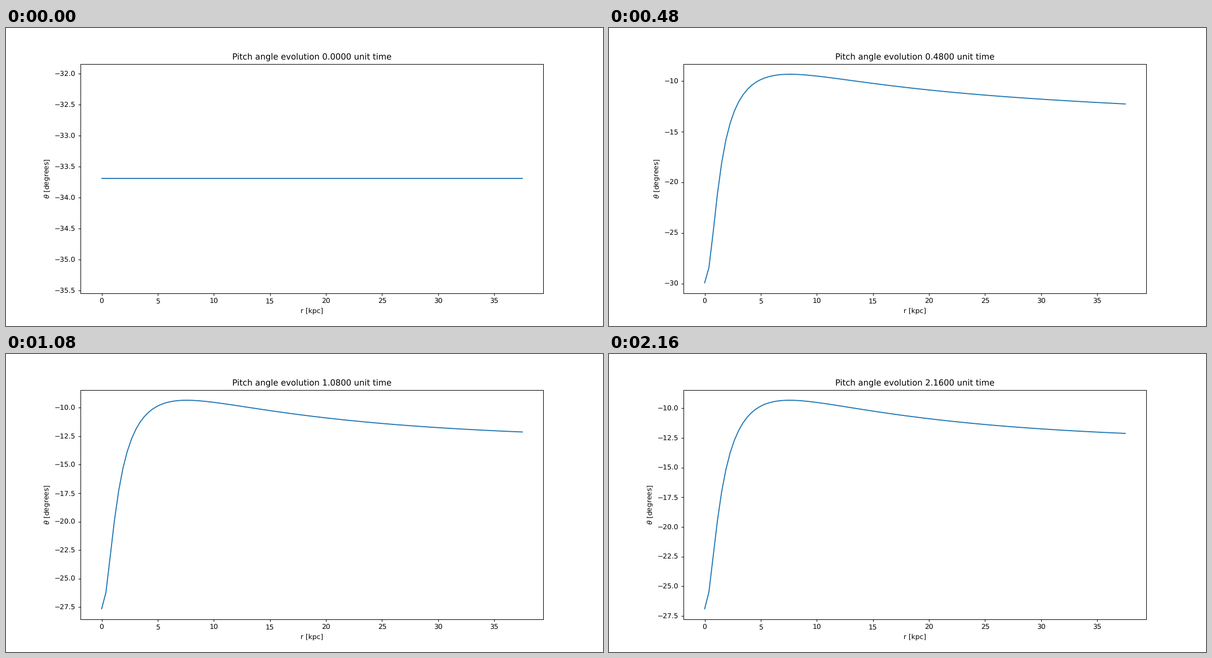
Write a matplotlib script that moves like this. It is 1058x529 px and loops after 2.2 s.

```python
import numpy as np
import matplotlib.pyplot as plt
from matplotlib.animation import FuncAnimation

WIDTH, HEIGHT = 1058, 529
DPI = WIDTH / 12
FRAMES, INTERVAL = 55, 40
DT = 0.04

X_START = 2 / 3                            # tan of the initial pitch angle
START = np.degrees(np.arctan(X_START))     # angles are kept positive here
R_MAX = 37.5

plt.rcParams["text.hinting"] = "none"


def settled_angle(r):
    """Steep core that fades into a slowly saturating outer disc."""
    width = 2.25 * r - 1.335 + 2.88 * np.exp(-r / 1.65)
    core = 20.085 * np.exp(-r ** 2 / width)
    return core + 12.815 - 6.25 * np.exp(-r / 17)


def shear_rate(r):
    """Shear of a flattening rotation curve, with a floor at the centre."""
    s2 = (r / 3) ** 2
    return np.maximum(267 * s2 / (1 + s2) ** 1.5, 15)


def core_excess(t):
    """Slow, diffusive relaxation at the centre, in degrees."""
    slow, fast = 3.93, 17.2
    rise = slow + fast - (START - settled_angle(0))
    return (slow * np.exp(-1.3 * t) + fast * np.exp(-5.6 * t)
            - rise * np.exp(-18 * t))


r = np.linspace(0, R_MAX, 100)
settled = settled_angle(r)
shear = shear_rate(r)
core_shape = 1 / (1 + (r / 1.23) ** 3)


def local_decay(t):
    """Share of the initial offset left by x' = shear * (x^2 - x_end^2)."""
    x_end = np.tan(np.radians(settled))
    c = (X_START - x_end) / (X_START + x_end) * np.exp(-2 * shear * x_end * t)
    x = x_end * (1 + c) / (1 - c)
    return (np.degrees(np.arctan(x)) - settled) / (START - settled)


def pitch(t):
    outer = START - settled - core_excess(0) * core_shape
    angle = settled + core_shape * core_excess(t) + outer * local_decay(t)
    return -np.round(angle, 9)


fig, ax = plt.subplots(figsize=(12, 6), dpi=DPI)
fig.subplots_adjust(top=1 - 63.6 / HEIGHT)
line, = ax.plot(r, pitch(0), color="#1f77b4")
ax.set_xlabel("r [kpc]")
ax.set_ylabel(r"$\theta$ [degrees]")
title = ax.set_title("")


def update(i):
    t = i * DT
    line.set_data(r, pitch(t))
    ax.relim()
    ax.autoscale_view()
    title.set_text(f"Pitch angle evolution {t:.4f} unit time")
    return line, title


anim = FuncAnimation(fig, update, frames=FRAMES, interval=INTERVAL,
                     init_func=lambda: update(0), repeat=True,
                     repeat_delay=0, blit=False)
plt.show()
```
